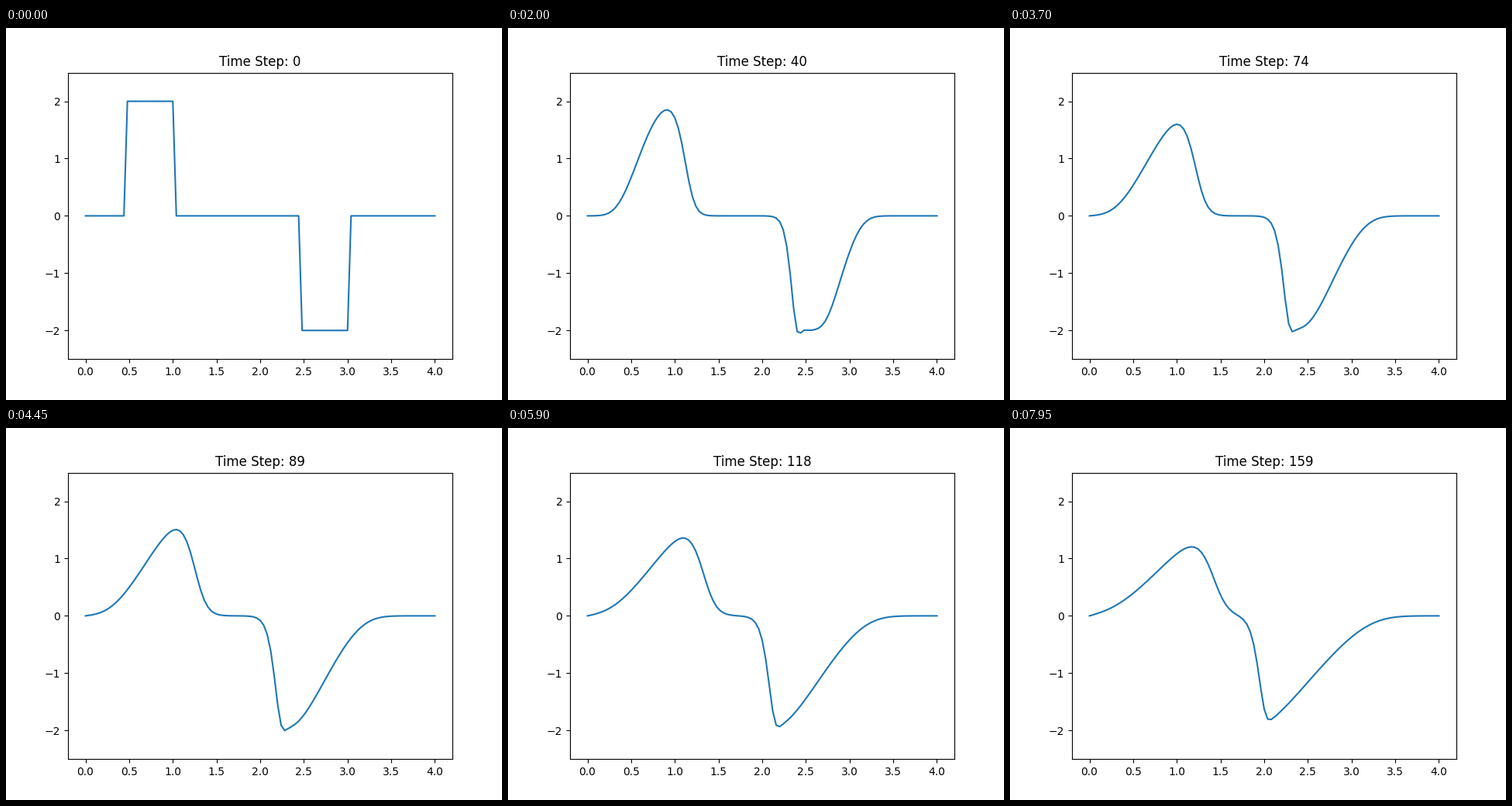
A matplotlib script that plays this animation: 640 px wide and 480 px high, repeating every 8000 ms.

```python
import numpy as np
import matplotlib.pyplot as plt
from matplotlib.animation import FuncAnimation

# Viscous Burgers equation, explicit backward/central differences
NX, LENGTH, STEPS = 101, 4.0, 160
NU = 0.07
DX = LENGTH / (NX - 1)
DT = DX * NU


def initial_wave():
    u = np.zeros(NX)
    u[12:26] = 2
    u[62:76] = -2
    return u


def advance(u):
    new = u.copy()
    left, mid, right = u[:-2], u[1:-1], u[2:]
    new[1:-1] = (mid - mid * DT / DX * (mid - left)
                 + NU * DT / DX**2 * (right - 2 * mid + left))
    return new


waves = [initial_wave()]
for _ in range(STEPS - 1):
    waves.append(advance(waves[-1]))

x = np.linspace(0, LENGTH, NX)
fig, ax = plt.subplots(figsize=(6.4, 4.8), dpi=100)
line, = ax.plot(x, waves[0])
ax.set_ylim(-2.5, 2.5)
title = ax.set_title("Time Step: 0")


def update(step):
    line.set_ydata(waves[step])
    title.set_text(f"Time Step: {step}")
    return line, title


anim = FuncAnimation(fig, update, frames=STEPS, interval=50,
                     repeat=True, repeat_delay=0, blit=False)
plt.show()
```
